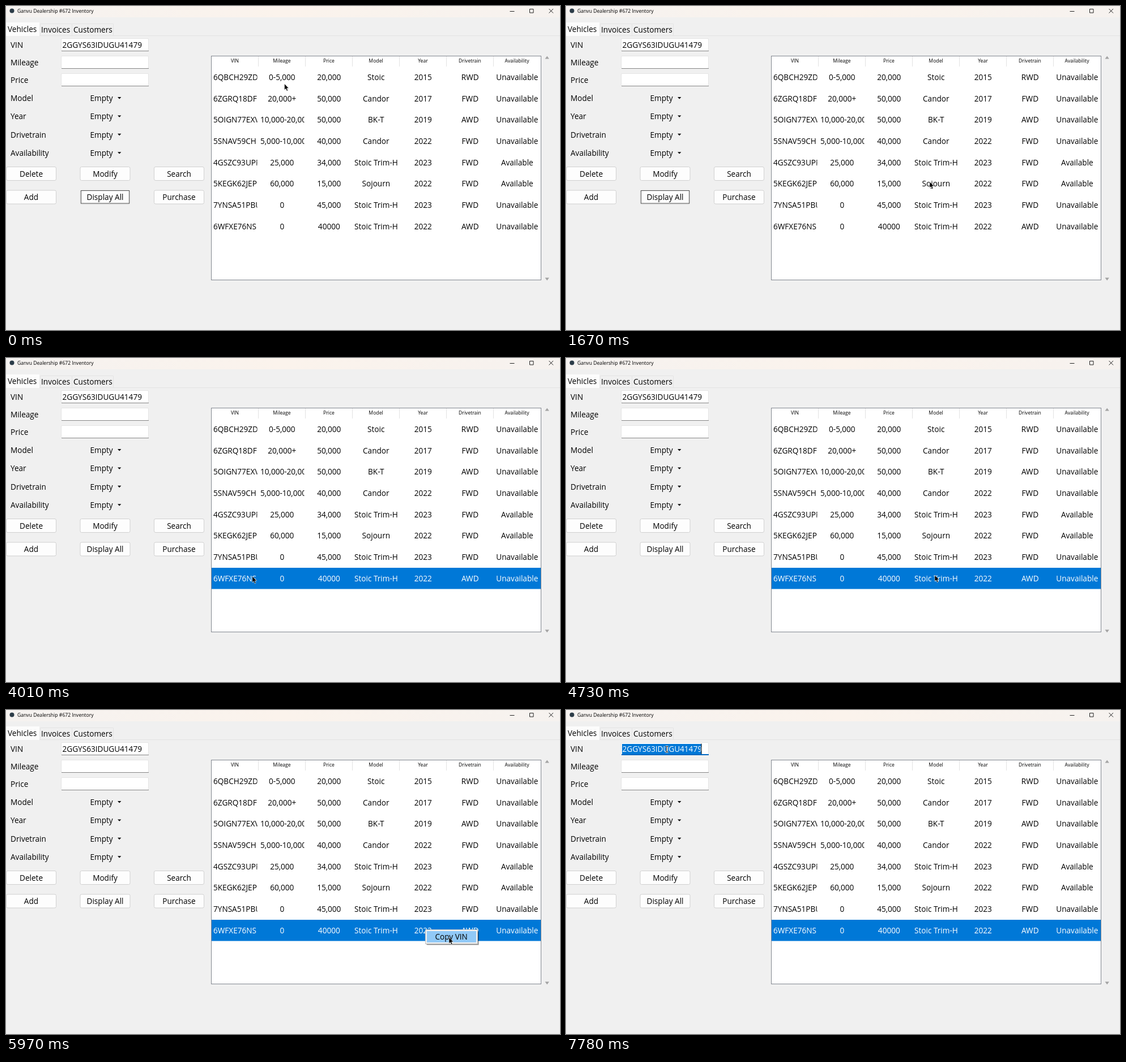
Animation, 978 px wide and 573 px high, one loop 8000 ms. Source, as an HTML page:

```html
<!DOCTYPE html>
<html lang="en">
<head>
<meta charset="utf-8">
<title>Inventory</title>
<style>
html, body { margin: 0; width: 100%; height: 100%; overflow: hidden; background: #f0f0f0; }
svg { display: block; }
text { font: 13.6px "Open Sans", "Noto Sans", sans-serif; white-space: pre; }
.small { font-size: 8.65px; }
.mid { text-anchor: middle; }
</style>
</head>
<body>
<svg id="stage" width="978" height="573" viewBox="0 0 978 573"></svg>
<script>
const LOOP = 8000, BLUE = '#0078d7', VIN = '2GGYS63IDUGU41479';
const SELECT_ROW = 3290, MENU_OPEN = 5140, MENU_CLOSE = 6080;
const FOCUS = 6870, SELECT_ALL = 6990, CARET_OFF = 7470, CARET_ON = 7780;

const heads = ['VIN', 'Mileage', 'Price', 'Model', 'Year', 'Drivetrain', 'Availability'];
const rows = [
  '6QBCH29ZD|0-5,000|20,000|Stoic|2015|RWD|Unavailable',
  '6ZGRQ18DF|20,000+|50,000|Candor|2017|FWD|Unavailable',
  '5OIGN77EXV|10,000-20,000|50,000|BK-T|2019|AWD|Unavailable',
  '5SNAV59CH|5,000-10,000|40,000|Candor|2022|FWD|Unavailable',
  '4GSZC93UPR|25,000|34,000|Stoic Trim-H|2023|FWD|Available',
  '5KEGK62JEP|60,000|15,000|Sojourn|2022|FWD|Available',
  '7YNSA51PBU|0|45,000|Stoic Trim-H|2023|FWD|Unavailable',
  '6WFXE76NS|0|40000|Stoic Trim-H|2022|AWD|Unavailable'
];

// Pointer keys: time, x, y
const path = [
  [0, 491.5, 137.5], [120, 484, 125], [300, 590, 140], [480, 698, 215], [640, 660, 315],
  [840, 560, 334], [1020, 465, 370], [1200, 500, 411], [1440, 605, 380], [1670, 642, 311],
  [1850, 630, 230], [2070, 550, 194], [2300, 465, 230], [2510, 450, 298], [2750, 470, 365],
  [2950, 528, 392], [3170, 522, 388], [3290, 516, 384], [3410, 521, 384], [3590, 521, 384],
  [3800, 470, 390], [4010, 435, 386], [4130, 429, 388], [4370, 521, 388], [4700, 640, 384],
  [5000, 735, 384], [5140, 742, 386], [5260, 742, 387], [5400, 737, 396], [5600, 752, 423],
  [5800, 775, 412], [5970, 782, 402], [6080, 782, 402], [6560, 178, 69], [LOOP, 178, 69]
];

const rect = (x, y, w, h, fill, more = '') =>
  `<rect x="${x}" y="${y}" width="${w}" height="${h}" fill="${fill}" ${more}/>`;
const line = (d, stroke, more = '') => `<path d="${d}" fill="none" stroke="${stroke}" ${more}/>`;
const text = (s, x, cy, cls = '') =>
  `<text x="${x}" y="${cy + (cls.includes('small') ? 3.1 : 4.9)}" class="${cls}">${s}</text>`;

function titleBar() {
  return `<linearGradient id="bar"><stop stop-color="#f5f2f0"/><stop offset=".5" stop-color="#fbf3ec"/>
    <stop offset="1" stop-color="#f6f2ef"/></linearGradient>` +
    rect(0, 0, 978, 20, 'url(#bar)') +
    '<circle cx="10.5" cy="8.5" r="4" fill="#2c3c48"/>' +
    text('Ganvu Dealership #672 Inventory', 20, 9, 'small') +
    line('M889.5 9.5h8M924.5 5.5h6.5v6.5h-6.5zM958.5 5l7.5 7.5M966 5l-7.5 7.5', '#222');
}

function tabs() {
  return line('M0 52.5H978', '#e2e2e2') +
    line('M60.5 52V31.5H116.5V52M116.5 31.5H189.5V52', '#e4e4e4') +
    rect(0, 29, 59, 24, '#fcfcfc') +
    text('Vehicles', 3, 41) + text('Invoices', 62, 42) + text('Customers', 119, 42);
}

function form() {
  let out = '';
  ['VIN', 'Mileage', 'Price'].forEach((s, i) => {
    const y = 57 + 31 * i;
    out += text(s, 8, y + 12) +
      rect(97.5, y + .5, 154, 22, '#fff', 'rx="1.5" stroke="#e4e4e4"') +
      line(`M98 ${y + 22.5}H252`, '#868686');
  });
  ['Model', 'Year', 'Drivetrain', 'Availability'].forEach((s, i) => {
    const y = 163 + 32.4 * i;
    out += text(s, 8, y) + text('Empty', 148.5, y) +
      `<path d="M197 ${y - 2}h6.4l-3.2 3.4z"/>`;
  });
  ['Delete', 'Modify', 'Search', 'Add', 'Display All', 'Purchase'].forEach((s, i) => {
    const x = 130.5 * (i % 3), y = i < 3 ? 284 : 325.5;
    out += rect(x + .5, y + .5, 88, 24, '#fdfdfd', 'rx="2.5" stroke="#d0d0d0"') +
      text(s, x + 44.5, y + 13, 'mid');
  });
  return out + '<g id="ring">' + rect(132.5, 326.5, 85, 22.5, 'none', 'stroke="#555"') + '</g>';
}

function table() {
  let out = rect(362.5, 88.5, 582, 396, '#fff', 'stroke="#828790"');
  heads.forEach((s, c) => {
    out += text(s, 404 + 83 * c, 97, 'small mid');
    if (c) out += line(`M${362.5 + 83 * c} 89V107`, '#e2e2e2');
  });
  rows.forEach((row, r) => {
    const top = 107 + 37.7 * r;
    if (r === 7) out += '<g id="picked">' + rect(363, 371, 581, 37.5, BLUE, 'id="pickedBg"');
    row.split('|').forEach((s, c) => {
      const long = c === 0 || s.length > 11;
      out += `<svg x="${366 + 83 * c}" y="${top}" width="77.5" height="37">` +
        text(s, long ? 0 : 38.3, 19, long ? '' : 'mid') + '</svg>';
    });
    if (r === 7) out += '</g>';
  });
  return out + '<path d="M951.5 93.5h7.4l-3.7-5zM951.5 480.5h7.4l-3.7 5z" fill="#a3a3a3"/>';
}

function overlays() {
  return '<g id="focus">' + line('M98 79H252', '#0067c0', 'stroke-width="2"') + '</g>' +
    rect(99, 60, 140, 18, BLUE, 'id="selection"') +
    `<g id="vin">${text(VIN, 99.5, 69)}</g>` +
    rect(0, 59.5, 1, 18.5, '#000', 'id="caret"') +
    '<g id="menu">' + rect(743, 391, 92, 25, '#000', 'opacity=".22" rx="1"') +
    rect(742, 390, 92, 25, '#000', 'opacity=".3"') +
    rect(740.5, 388.5, 92, 25, '#f0f0f0', 'stroke="#c4c4c4"') +
    rect(743, 391, 87, 20, '#91c9f7', 'id="hover"') + text('Copy VIN', 757.5, 401.5) + '</g>' +
    '<path id="arrow" d="M0 0V11L2.5 8.8 4.2 12.8 6.1 12 4.4 8.1H7.7Z" stroke="#fff" stroke-width=".6"/>' +
    '<g id="beam">' + ['#fff', '#000'].map((c, i) =>
      line('M-2.5 -4.5H-.8L0 -4 .8 -4.5H2.5M0 -4V5M-2.5 5.5H-.8L0 5 .8 5.5H2.5', c,
        `stroke-width="${2.4 - 1.4 * i}"`)).join('') + '</g>';
}

document.getElementById('stage').innerHTML =
  titleBar() + tabs() + form() + table() + overlays();

const el = id => document.getElementById(id);
const show = (id, on) => el(id).setAttribute('visibility', on ? 'visible' : 'hidden');
const paint = (id, color) => el(id).setAttribute('fill', color);

// Monotone cubic through the keys, so rests stay still
const slope = (i, a) => (path[i + 1][a] - path[i][a]) / (path[i + 1][0] - path[i][0]);
function tangent(i, a) {
  if (i === 0 || i === path.length - 1) return 0;
  const p = slope(i - 1, a), q = slope(i, a);
  return p * q > 0 ? 2 * p * q / (p + q) : 0;
}
function pointer(t, a) {
  const i = path.findIndex((k, n) => n && t < k[0]) - 1;
  const k = path[i], n = path[i + 1], h = n[0] - k[0], u = (t - k[0]) / h, v = 1 - u;
  return v * v * (1 + 2 * u) * k[a] + u * u * (3 - 2 * u) * n[a] +
    h * u * v * (v * tangent(i, a) - u * tangent(i + 1, a));
}

function draw(t) {
  const x = pointer(t, 1), y = pointer(t, 2);
  const picked = t >= SELECT_ROW, all = t >= SELECT_ALL;
  const menu = t >= MENU_OPEN && t < MENU_CLOSE;
  const typing = x > 97 && x < 252 && y > 57 && y < 80;

  show('ring', !picked);
  show('pickedBg', picked);
  paint('picked', picked ? '#fff' : '#000');
  show('menu', menu);
  show('hover', menu && x > 743 && x < 830 && y > 390 && y < 412);

  show('focus', t >= FOCUS);
  show('selection', all);
  paint('vin', all ? '#fff' : '#000');
  show('caret', t >= FOCUS && (t < CARET_OFF || t >= CARET_ON));
  el('caret').setAttribute('x', all ? 238.5 : 180);

  show('arrow', !typing);
  show('beam', typing);
  for (const id of ['arrow', 'beam']) el(id).setAttribute('transform', `translate(${x} ${y})`);
}

const start = performance.now();
function tick() {
  draw((performance.now() - start) % LOOP);
  requestAnimationFrame(tick);
}
tick();
</script>
</body>
</html>
```
